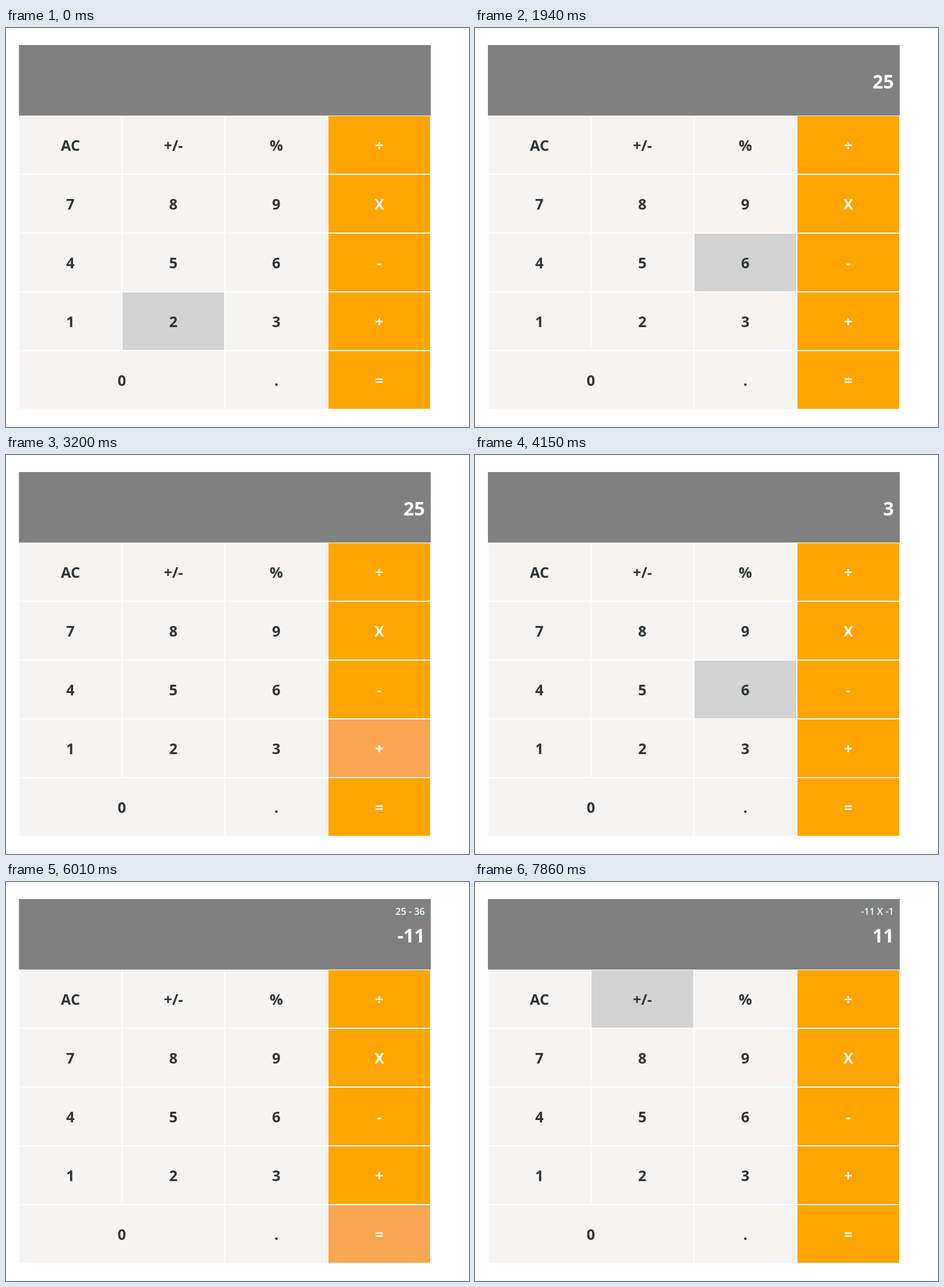
An HTML page for the animation above (8000 ms loop, 787 by 679 pixels).

```html
<!DOCTYPE html>
<html lang="en">
<head>
<meta charset="utf-8">
<title>Calculator</title>
<style>
  html, body { margin: 0; width: 100%; height: 100%; overflow: hidden; background: #fff; }
  body { font: 700 25px "Open Sans", sans-serif; }
  #screen { position: absolute; left: 22px; top: 29px; width: 700px; height: 120px; background: #808080; }
  #screen div { position: absolute; right: 10px; white-space: pre; }
  #sum { top: 10px; font-size: 16px; font-weight: 600; color: #f0ffff; }
  #value { top: 40px; font-size: 32px; color: #fff; }
  #keys { position: absolute; left: 22px; top: 149px; display: grid; grid: repeat(5, 100px) / repeat(4, 175px); }
  #keys div {
    display: flex; align-items: center; justify-content: center; box-sizing: border-box;
    border: 1px solid #fff; background: #f6f4f3; color: #2d3436;
  }
  #keys .op { background: #ffa500; color: #fff; }
  #keys .wide { grid-column: span 2; }
  #keys .hover { background: #d3d3d3; }
  #keys .op.hover { background: #f8a650; }
</style>
</head>
<body>
<div id="screen"><div id="sum"></div><div id="value"></div></div>
<div id="keys"></div>
<script>
const LOOP = 8000;
// [start ms, key under the pointer]
const hovers = [
  [0, '2'], [690, '5'], [1940, '6'], [2060, '3'], [2250, '-'], [3200, '+'], [3260, '3'],
  [4150, '6'], [5160, '3'], [5220, '+'], [5280, '='], [6290, '+'], [6340, '3'],
  [6680, '6'], [6740, '8'], [7090, '+/-']
];
// [start ms, value, sum]
const readouts = [
  [0, '', ''], [470, '2', ''], [1730, '25', ''], [3920, '3', ''], [5030, '36', ''],
  [6010, '-11', '25 - 36'], [7860, '11', '-11 X -1']
];

const $ = id => document.getElementById(id);
const keys = {};
for (const label of 'AC +/- % ÷ 7 8 9 X 4 5 6 - 1 2 3 + 0 . ='.split(' ')) {
  const key = keys[label] = document.createElement('div');
  key.textContent = label;
  if ('÷X-+='.includes(label)) key.classList.add('op');
  if (label === '0') key.classList.add('wide');
  $('keys').append(key);
}

const at = (list, t) => list.findLast(step => step[0] <= t);

function draw(now) {
  const t = now % LOOP;
  const [, hovered] = at(hovers, t);
  const [, value, sum] = at(readouts, t);
  for (const label in keys) keys[label].classList.toggle('hover', label === hovered);
  $('value').textContent = value;
  $('sum').textContent = sum;
}

const start = performance.now();
function tick() {
  draw(performance.now() - start);
  requestAnimationFrame(tick);
}
tick();
</script>
</body>
</html>
```
